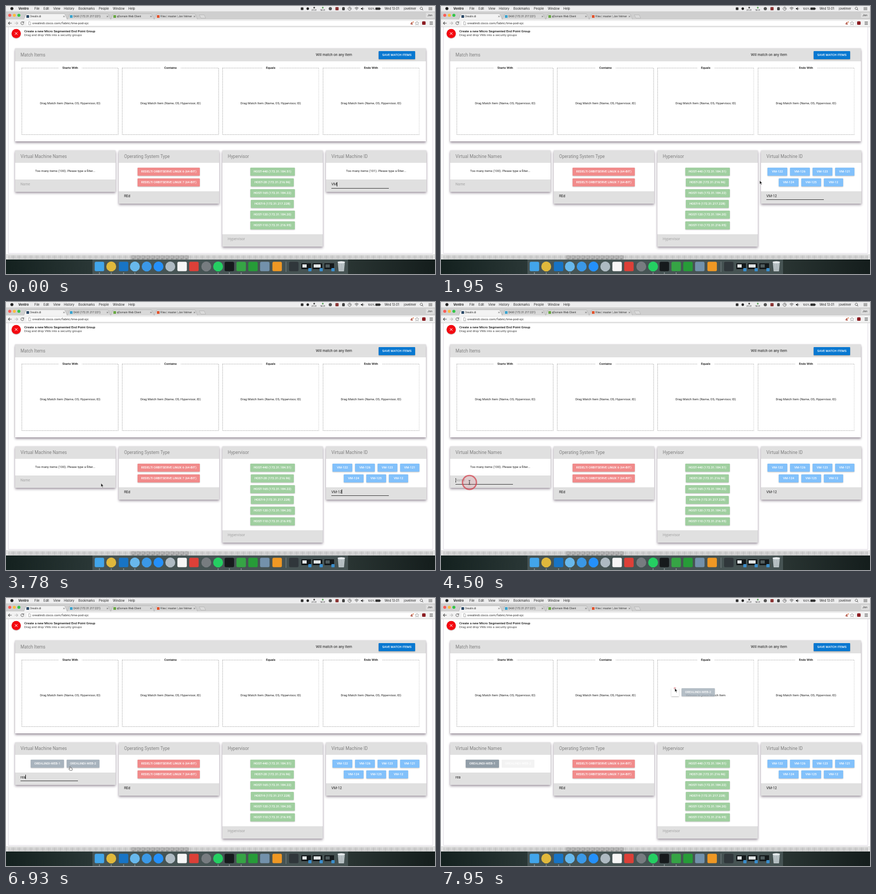
Recreate the animation shown at these times as an HTML page. Size 799x499 px, loop 8 s.

```html
<!DOCTYPE html>
<html lang="en">
<head>
<meta charset="utf-8">
<title>Match items</title>
<style>
  html, body { margin: 0; width: 100%; height: 100%; overflow: hidden; background: #fff; }
  body { font: 5.85px Roboto, sans-serif; color: #222; }
  #stage { position: absolute; left: 0; top: 0; width: 799px; height: 499px; overflow: hidden; }
  #stage > * { position: absolute; box-sizing: border-box; white-space: nowrap; }
  svg { left: 0; top: 0; width: 799px; height: 499px; }
  h2 { margin: 0; font-size: 8.3px; font-weight: 400; color: #808080; background: #e0e0e0;
       height: 23px; line-height: 23px; padding-left: 10px; }
  .card { top: 269px; width: 186.5px; background: #fff; border-radius: 1px; }
  .card, #match { box-shadow: 0 2.5px 4px rgba(65, 48, 70, .48), 0 0 2px rgba(80, 60, 85, .25); }
  .message { height: 31.2px; line-height: 31.2px; text-align: center; }
  .chips { display: flex; flex-wrap: wrap; justify-content: center; padding: 6.3px 8px; }
  .chip { box-sizing: border-box; height: 15.05px; line-height: 15.4px; margin: 2.5px; padding: 0 6.5px;
          min-width: 36.8px; text-align: center; font-weight: 500; color: #fff; border-radius: 1.2px;
          box-shadow: 0 .8px 2px rgba(0, 0, 0, .28); }
  [hidden] { display: none; }
  .field { position: relative; height: 23.3px; padding-left: 10px; background: #e0e0e0;
           font-size: 6.69px; line-height: 19px; }
  .hint { color: #a4a4a4; }
  .line { position: absolute; left: 10px; top: 15.7px; width: 106.5px; height: .9px; background: #444; }
  .caret { display: inline-block; width: .8px; height: 8px; margin-right: -.8px; vertical-align: -1.6px; background: #222; }
  #match { left: 17px; top: 79px; width: 765px; height: 173px; background: #fff; }
  #match h2 { height: 24px; line-height: 24px; }
  .zone { top: 115px; width: 180.5px; height: 125px; line-height: 133px; text-align: center; }
  .zone b { position: absolute; left: 50%; top: -5px; transform: translateX(-50%); padding: 0 7px;
            background: #fff; line-height: 11px; font-weight: 500; color: #111; }
  #save { left: 694px; top: 83.5px; width: 68px; height: 15px; line-height: 15.4px; text-align: center;
          color: #fff; background: #0878d1; font-weight: 500; border-radius: 1px; box-shadow: 0 1px 2px rgba(0, 0, 0, .3); }
  #handle { width: 14px; height: 15px; background: #fff; box-shadow: 0 1px 2px rgba(0, 0, 0, .3); }
  #dragged { margin: 0; opacity: .85; }
</style>
</head>
<body>
<div id="stage">
  <svg id="frame" viewBox="0 0 799 499"></svg>
  <div style="left:34px;top:43px;font-size:6.17px;line-height:8px;font-weight:500;color:#111">Create a new Micro Segmented End Point Group</div>
  <div style="left:34px;top:50.4px;line-height:8px;color:#444">Drag and drop VMs into a security groups</div>
  <div id="match"><h2>Match Items</h2></div>
  <div style="left:577px;top:86px;line-height:10px;font-size:6.69px">Will match on any item</div>
  <div id="save">SAVE MATCH ITEMS</div>
</div>
<script>
const LOOP = 8000;
const stage = document.getElementById('stage');
const frame = document.getElementById('frame');
const add = html => {
  stage.insertAdjacentHTML('beforeend', html);
  return stage.lastElementChild;
};

// --- window frame, menu bar and dock ---
const rect = (x, y, w, h, fill, r = 0) => `<rect x="${x}" y="${y}" width="${w}" height="${h}" rx="${r}" fill="${fill}"/>`;
const dot = (x, y, r, fill) => `<circle cx="${x}" cy="${y}" r="${r}" fill="${fill}"/>`;
const stroke = (d, color, width = .8) => `<path d="${d}" fill="none" stroke="${color}" stroke-width="${width}"/>`;
const label = (x, y, text, size, more = '') => `<text x="${x}" y="${y}" font-size="${size}" ${more}>${text}</text>`;
const cross = (x, y, r, color, width) => stroke(`M${x - r} ${y - r}l${2 * r} ${2 * r}m0 ${-2 * r}l${-2 * r} ${2 * r}`, color, width);

function menuBar() {
  const items = [[53, 'File'], [70, 'Edit'], [88, 'View'], [108, 'History'], [135, 'Bookmarks'], [173, 'People'],
    [199, 'Window'], [228, 'Help'], [674, '100%', 5], [705, 'Wed 13:01'], [741, 'jovelmer']];
  return rect(0, 0, 799, 10, '#ededee') + dot(11, 4.8, 2.8, '#222')
    + '<g font-family="Inter, sans-serif" fill="#222">'
    + label(23, 7, 'Ventro', 5.9, 'font-weight="700"')
    + items.map(([x, text, size = 5.7]) => label(x, 7, text, size)).join('')
    + label(569, 9, '21:01', 4) + label(585, 9, '18:01', 4) + '</g>'
    + rect(549, 2.5, 5, 5, '#333', 1) + dot(562, 5, 2.4, '#222') + dot(574, 3, 1.5, '#333') + dot(590, 3, 1.5, '#4a9a4a')
    + dot(604, 5, 3, '#555') + rect(613.5, 2, 6, 6, '#8a3434', 1) + rect(626, 2, 5, 6, '#444', 1.5)
    + stroke('M640 2a3 3 0 1 0 .1 0M640 3v2h2', '#333', .7)
    + stroke('M649.5 4q3.5-3 7 0M651 5.7q2-1.6 4 0M652.6 7.2h.9', '#333', .9)
    + '<path d="M661 4h1.5l2-2v6l-2-2H661z" fill="#333"/>' + stroke('M665.7 3.5q1.2 1.5 0 3', '#333', .6)
    + rect(688, 2.8, 9, 4.4, '#333', .8) + rect(697.4, 4, .8, 2, '#333')
    + stroke('M773.5 2.2a2.2 2.2 0 1 0 .1 0M775 6l2 2', '#333', .8)
    + stroke('M787 3h7M787 5h7M787 7h7', '#333', .7);
}

function tabs() {
  const list = [[33, 'Orealin.di', '#2c4a68'], [114, 'DAXI (172.31.217.221)', '#3ba4cf'],
    [195, 'qDomain Web Client', '#6aa844'], [276, 'Files | master | Jon Velmer', '#e2552f']];
  const tab = ([x, text, color], i) =>
    `<path d="M${x} 25l4-9q.7-1.5 2-1.5h69q1.3 0 2 1.5l4 9" fill="${i ? '#d9d9d9' : '#f3f3f3'}" stroke="#a9a9a9" stroke-width=".6"/>`
    + rect(x + 5, 17, 5, 5, color, .5) + label(x + 11.5, 21.3, text, 5) + cross(x + 75, 19.5, 1.3, '#555', .7);
  return rect(0, 10, 799, 15, '#cfcfcf')
    + dot(7, 17.3, 2.8, '#fb5b55') + dot(15.5, 17.3, 2.8, '#fcbc3e') + dot(24, 17.3, 2.8, '#32c648')
    + list.map(tab).reverse().join('')
    + '<path d="M360 16.5h9l3 6h-9z" fill="#dadada" stroke="#a5a5a5" stroke-width=".5"/>'
    + rect(782, 12.5, 16, 9.5, '#dedede', 1.5) + label(785, 19.3, 'Jon', 5.4);
}

function toolbar() {
  return rect(0, 25, 799, 14, '#f2f2f2') + rect(38.5, 27, 732, 10, '#fff', 1.2)
    + stroke('M38.5 37.2h732M38.5 27h732', '#cfcfcf', .5)
    + stroke('M10.5 32h-6M7 29.3l-2.7 2.7 2.7 2.7', '#555', 1.1)
    + stroke('M16 32h6M19.3 29.3l2.7 2.7-2.7 2.7', '#bbb', 1.1)
    + stroke('M32.6 30.3a2.7 2.7 0 1 0 .5 2.2M33 28.8v2.2h-2.2', '#555', 1)
    + stroke('M42.3 29.2h2.3l1.4 1.5v4.2h-3.7z', '#777', .6)
    + label(49, 34.2, 'orealindi.cisco.com/fabric/tme-pod-sjc', 6.05)
    + label(753, 35, '4', 8, 'font-weight="700" fill="#a33524"') + dot(758.5, 29.8, 1, '#d86528')
    + stroke('M765.5 28.5l1.1 2.4 2.5.2-1.9 1.7.6 2.5-2.3-1.3-2.3 1.3.6-2.5-1.9-1.7 2.5-.2z', '#777', .6)
    + rect(775, 28.5, 6.5, 6.5, '#8c1c22', 1.5)
    + stroke('M789 29.7h6M789 32h6M789 34.3h6', '#555', 1) + rect(0, 38.5, 799, .7, '#bdbdbd');
}

function dock() {
  const icons = [[174, '#42a5ea'], [196, '#e0b83c', 1], [219, '#1874c5'], [240, '#68b8ec', 1], [262, '#3b98e6', 1],
    [284, '#2490fa', 1], [306, '#aebac2', 1], [328, '#f6f6f6'], [350, '#dc4038'], [373, '#777c80', 1], [395, '#25cf62', 1],
    [416, '#161a1c'], [438, '#36a445'], [460, '#279c38'], [482, '#7391ab'], [505, '#ef9824'], [536, '#30373b']];
  const windows = [559, 580, 602].map((x, i) => rect(x - 9, 479, 18, 11, '#14191b')
    + rect(x - 7, 481, i === 1 ? 13 : 8, 6, i === 2 ? '#4f5b5d' : '#dfe3e4') + rect(x + 4, 488, 6, 6, '#3b8dcb', 1));
  return rect(0, 462, 799, 10, '#e3e3e3') + rect(4, 464.5, 791, 7, 'url(#hatch)') + rect(232, 464.5, 108, 7, 'url(#dense)')
    + rect(0, 472, 799, 27, 'url(#wall)') + rect(161, 472, 476, 27, '#68767877')
    + icons.map(([x, color, round]) => round ? dot(x, 485, 9.2, color) : rect(x - 8.8, 476.2, 17.6, 17.6, color, 2.5)).join('')
    + [174, 196, 219, 240, 395, 416, 438].map(x => dot(x, 497.3, .8, '#dce4e5')).join('')
    + rect(521, 476, .6, 19, '#99a2a4') + windows.join('')
    + '<path d="M618 477h13l-1.6 17h-9.8z" fill="#bfc8cb"/><ellipse cx="624.5" cy="477" rx="7" ry="1.8" fill="#e8ecee"/>'
    + stroke('M621 480l1 13M624.5 480v13M628 480l-1 13', '#929da1', .7);
}

const zoneLefts = [29.3, 216.2, 402.8, 589.5];
frame.innerHTML = `<defs>
  <pattern id="hatch" width="11" height="7" patternUnits="userSpaceOnUse">${rect(0, 0, 11, 7, '#cecece')}${rect(2, 0, 1, 7, '#bcbcbc')}${rect(7, 2, 2, 5, '#dadada')}</pattern>
  <pattern id="dense" width="9" height="7" patternUnits="userSpaceOnUse">${rect(0, 0, 9, 7, '#b5b5b5')}${rect(1, 1, 4, 2, '#858585')}${rect(6, 0, 1, 7, '#979797')}</pattern>
  <linearGradient id="wall"><stop stop-color="#14211f"/><stop offset=".2" stop-color="#2a3736"/><stop offset=".8" stop-color="#293432"/><stop offset="1" stop-color="#141d1c"/></linearGradient></defs>`
  + `<g fill="#333">${menuBar()}${tabs()}${toolbar()}</g>`
  + stroke('M4.3 39V460.7H795V39', '#d5cfdb', .8) + dock()
  + dot(19, 51.8, 9, '#c9b5b5') + dot(19, 51.3, 8.5, '#f40810') + cross(19, 51.3, 2.4, '#fff', 1);

// --- drop zones and filter cards ---
const zones = ['Starts With', 'Contains', 'Equals', 'Ends With'].map((name, i) => {
  const zone = add(`<div class="zone" style="left:${zoneLefts[i]}px"><b>${name}</b><span></span></div>`);
  zone.insertAdjacentHTML('afterbegin', '<svg style="position:absolute;width:180.5px;height:125px"><rect x=".4" y=".4" width="179.6" height="124.2" fill="none" stroke="#858585" stroke-width=".7" stroke-dasharray="1.8 1.2"/></svg>');
  return { left: zoneLefts[i], text: zone.querySelector('span') };
});

const chip = (text, color, id = '') => `<div class="chip" ${id} style="background:${color}">${text}</div>`;

function card(left, title, hint, color, chips, message = '') {
  const root = add(`<div class="card" style="left:${left}px"><h2>${title}</h2>
    <div class="message">${message}</div><div class="chips">${chips.map(text => chip(text, color)).join('')}</div>
    <div class="field"><span class="value"></span><i class="caret"></i><span class="hint">${hint}</span><div class="line"></div></div></div>`);
  const find = name => root.querySelector('.' + name);
  const [value, caret, hintText, line, list, note] = ['value', 'caret', 'hint', 'line', 'chips', 'message'].map(find);
  return {
    chips: list.children,
    set(text, found, focused, blinkOn) {
      value.textContent = text;
      hintText.hidden = text !== '';
      line.hidden = !focused;
      caret.style.opacity = focused && blinkOn ? 1 : 0;
      list.hidden = !found;
      note.hidden = found;
    }
  };
}

const tooMany = count => `Too many items (${count}). Please type a filter...`;
const slate = '#a8b3bd', slateDark = '#929ea8';
const names = card(17, 'Virtual Machine Names', 'Name', slate, ['OREALINDI-WEB-1', 'OREALINDI-WEB-2'], tooMany(100));
const systems = card(210, 'Operating System Type', '', '#f18b8b',
  [6, 7].map(n => `REDELTI ORBITSERVE LINUX ${n} (64-BIT)`));
const hosts = card(403, 'Hypervisor', 'Hypervisor', '#a0cfa0',
  ['440 (172.31.184.51)', '28 (172.31.216.96)', '165 (172.31.184.22)', '9 (172.31.217.228)', '120 (172.31.184.20)', '110 (172.31.216.95)'].map(s => 'HOST-' + s));
const ids = card(596, 'Virtual Machine ID', 'ID', '#82c1fb',
  [122, 126, 123, 121, 124, 125, 12].map(n => 'VM-' + n), tooMany(101));
systems.set('REd', true);
hosts.set('', true);

// --- pointer and dragged item ---
const handle = add('<div id="handle"></div>');
const dragged = add(chip('OREALINDI-WEB-2', slate, 'id="dragged"'));
const overlay = add(`<svg viewBox="0 0 799 499"><circle fill="#d8404a" fill-opacity=".13" stroke="#d23d48" stroke-opacity=".7"/>
  <g stroke-linejoin="round">
    <path data-kind="arrow" d="M0 0V6.8L1.6 5.3 2.7 7.9 3.8 7.4 2.7 4.9H4.8Z" fill="#111" stroke="#fff" stroke-width=".5"/>
    <path data-kind="beam" d="M-1.6-4Q0-4 0-3V3Q0 4-1.6 4M1.6-4Q0-4 0-3M1.6 4Q0 4 0 3M-.8 1H.8" fill="none" stroke="#222" stroke-width=".8"/>
    <path data-kind="hand" d="M0 0c.9 0 .9.6.9 2.5l2.6.7q.8.3.6 1.3l-.6 2.5H-.6L-2.6 4.3q0-.9 1.7-.1V.8Q-.9 0 0 0Z" fill="#fff" stroke="#222" stroke-width=".6"/>
  </g></svg>`);
const ring = overlay.querySelector('circle');
const pointer = overlay.querySelector('g');

// [ms, x, y, shape until the next stop]
const route = [
  [1560, 648, 338, 'beam'], [1740, 610, 328, 'arrow'], [1950, 593.5, 325, 'arrow'], [2370, 598, 332, 'arrow'],
  [2640, 640, 352, 'beam'], [2850, 651, 357, 'beam'], [3240, 651, 357, 'arrow'], [3990, 66, 333, 'beam'],
  [4260, 53, 336, 'beam'], [4860, 53, 336, ''], [5490, 53, 332, 'arrow'], [5730, 56.5, 317.5, 'arrow'],
  [6330, 60, 317.5, 'arrow'], [6480, 90, 314, 'hand'], [6600, 108, 313, 'hand'], [6750, 112, 313.5, 'hand'],
  [6930, 119.5, 314, 'hand'], [7230, 119.5, 314, 'arrow'], [7950, 435.5, 168, 'arrow'], [LOOP, 435.5, 168, 'arrow']
];
const clamp = v => Math.max(0, Math.min(1, v));

function pointerAt(t) {
  const i = route.findLastIndex(stop => stop[0] <= t);
  if (i < 0) return { x: 0, y: 0, kind: '' };
  const [t0, x0, y0, kind] = route[i], [t1, x1, y1] = route[i + 1];
  const u = (t - t0) / (t1 - t0), e = u * u * (3 - 2 * u);
  return { x: x0 + (x1 - x0) * e, y: y0 + (y1 - y0) * e, kind };
}

// The last entry whose start has been reached
const stepAt = (t, steps) => steps.findLast(([start]) => t >= start)[1];

const CLICK = 4380, GRAB = 7170, DRAG = 7290;

function render(t) {
  const { x, y, kind } = pointerAt(t);
  const dragging = t >= DRAG;

  ids.set(stepAt(t, [[0, 'VM'], [750, 'VM-'], [930, 'VM-1'], [1110, 'VM-12']]), t >= 1200, t < CLICK,
    stepAt(t, [[0, true], [570, false], [750, true], [1650, false], [2190, true], [2730, false], [3270, true], [3810, false]]));
  names.set(stepAt(t, [[0, ''], [4860, 'r'], [5010, 're'], [5160, 'rea']]), t >= 5310, t >= CLICK && t < GRAB,
    stepAt(t, [[0, true], [5690, false], [6750, true]]));

  names.chips[0].style.background = dragging ? slateDark : slate;
  const source = names.chips[1].style;
  source.background = dragging ? '#f3f3f3' : slate;
  source.boxShadow = dragging ? 'none' : '';

  for (const zone of zones) {
    const over = dragging && y > 115 && y < 240 && x > zone.left && x < zone.left + 180.5;
    zone.text.textContent = over ? 'Release to place Match Item' : 'Drag Match Item (Name, OS, Hypervisor, ID)';
  }

  handle.hidden = dragged.hidden = !dragging;
  handle.style.transform = `translate(${x - 6.5}px, ${y}px)`;
  dragged.style.transform = `translate(${x + 12.5}px, ${y}px)`;
  for (const el of [handle, dragged]) el.style.left = el.style.top = 0;

  pointer.setAttribute('transform', `translate(${x} ${y})`);
  for (const shape of pointer.children) shape.style.display = shape.dataset.kind === kind ? '' : 'none';

  const grabbed = t >= GRAB;
  const radius = grabbed ? 13 - 11.5 * clamp((t - GRAB) / 360) : 13 * clamp((t - CLICK + 60) / 120);
  ring.style.display = grabbed || (t >= CLICK && t < 4650) ? '' : 'none';
  ring.style.opacity = grabbed ? 1 : 1 - clamp((t - 4530) / 120);
  ring.setAttribute('cx', x);
  ring.setAttribute('cy', y);
  ring.setAttribute('r', radius);
  ring.setAttribute('stroke-width', Math.min(2.6, radius / 2));
}

function tick() {
  render(performance.now() % LOOP);
  requestAnimationFrame(tick);
}
tick();
</script>
</body>
</html>
```
